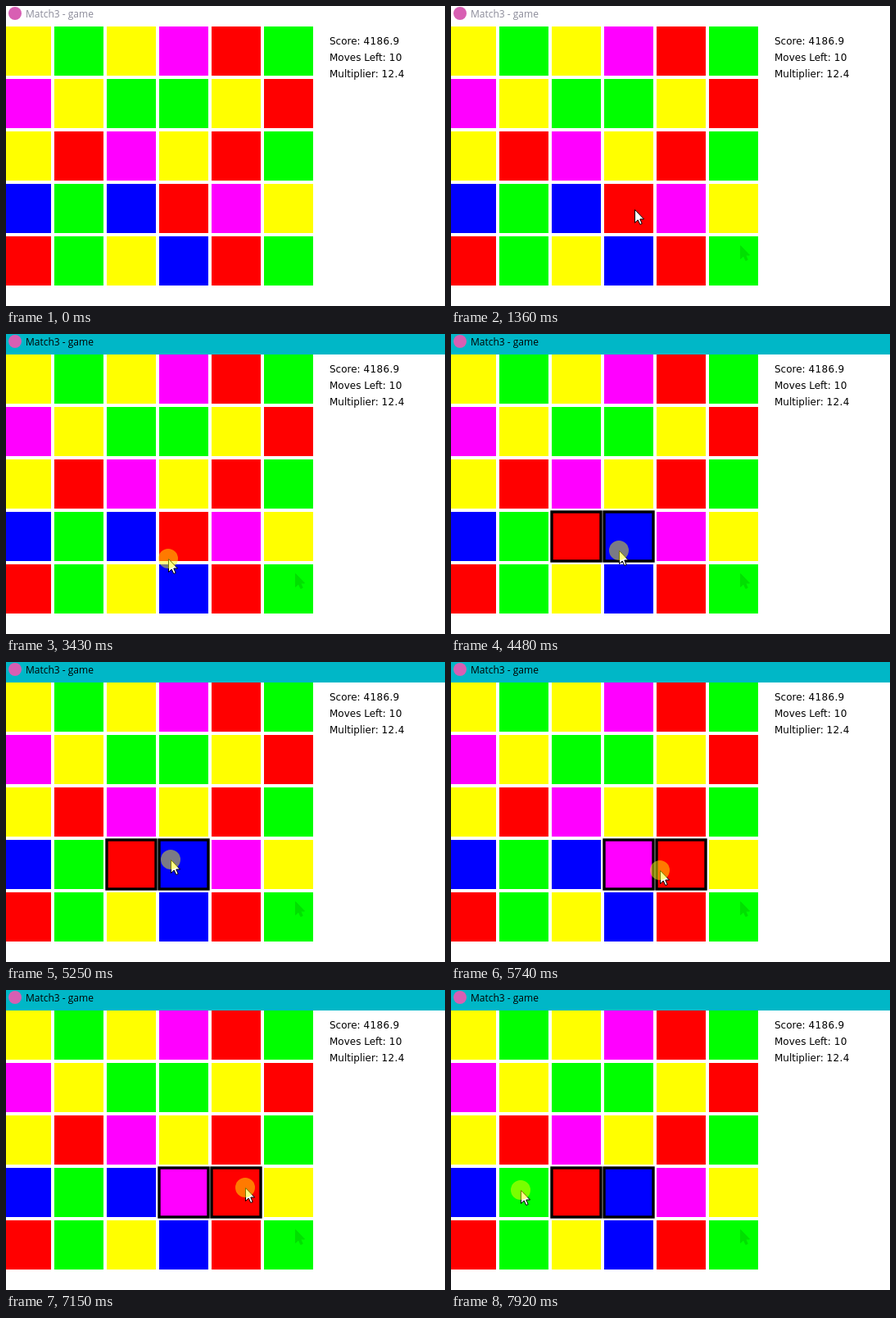
An HTML page for the animation above (7.99 s loop, 536 by 366 pixels).

```html
<!DOCTYPE html>
<html lang="en">
<head>
<meta charset="utf-8">
<title>Match3 - game</title>
<style>
  html, body { margin: 0; width: 100%; height: 100%; overflow: hidden; background: #fff; }
  #stage { position: absolute; left: 0; top: 0; width: 536px; height: 366px; overflow: hidden; }
  svg { position: absolute; left: 0; top: 0; }
  #bar { position: absolute; left: 0; top: 0; width: 536px; height: 25px; background: #fff; color: #8b8b99;
    font: 12px/20px "Open Sans", "Noto Sans", sans-serif; }
  #bar.active { background: #00b7c7; color: #000; }
  #bar i { position: absolute; left: 3px; top: 1px; width: 16px; height: 16px; border-radius: 50%; background: #d85fb3; }
  #bar span { position: absolute; left: 24px; top: 0; white-space: pre; }
  #stats { position: absolute; left: 395px; top: 33px; color: #000; white-space: pre;
    font: 12px/20px "DejaVu Sans", sans-serif; }
  #stats span { letter-spacing: .03em; }
</style>
</head>
<body>
<div id="stage">
  <div id="bar"><i></i><span>Match3 - game</span></div>
  <div id="stats">Score: <span>4186.9</span>
Moves Left: <span>10</span>
Multiplier: <span>12.4</span></div>
  <svg width="536" height="366" viewBox="0 0 536 366">
    <defs>
      <path id="arrow" d="M.5 .5V16.5L4.2 13L6.8 18.5L9.2 17.5L6.8 12H11.5Z"/>
    </defs>
    <g id="tiles"></g>
    <use id="trail" href="#arrow" x="353" y="292" fill="#00e000" stroke="#00e000"/>
    <g id="frames" fill="none" stroke="#000" stroke-width="3.4"></g>
    <g id="pointer">
      <use href="#arrow" fill="#fff" stroke="#000"/>
      <circle id="press" r="12" fill="#ff0" fill-opacity=".48"/>
    </g>
  </svg>
</div>
<script>
const LOOP = 7990, STEP = 70, PITCH = 64, SIZE = 60;
const COLORS = { Y: '#ff0', G: '#0f0', M: '#f0f', R: '#f00', B: '#00f' };
const BOARD = ['YGYMRG', 'MYGGYR', 'YRMYRG', 'BGBRMY', 'RGYBRG'];
const ENTER = 260, ARRIVE = 880, HOVER = 1080, REST = 1830, FOCUS = 1900, PRESS = 2160, DRAG = 3850;
const HELD = { col: 3, row: 3 }, ANCHOR = { x: 228, y: 246 };

// Circling around the anchor: time, angle in degrees, radius
const SPIN = [
  [2160, 526, 4], [2550, 270, 21], [2940, 262, 10], [3220, 182, 58], [3430, 137, 41],
  [3850, -50, 33], [4480, -218, 29], [5250, -529.5, 27.5], [6230, -878, 32], [7910, -1259, 143]
];

const $ = id => document.getElementById(id);
const mix = (a, b, k) => a + (b - a) * k;
const span = (t, from, to) => Math.min(1, Math.max(0, (t - from) / (to - from)));

function addRect(parent) {
  const r = document.createElementNS('http://www.w3.org/2000/svg', 'rect');
  r.setAttribute('width', SIZE);
  r.setAttribute('height', SIZE);
  return parent.appendChild(r);
}

function place(rect, col, row) {
  rect.setAttribute('x', col * PITCH - 5);
  rect.setAttribute('y', row * PITCH + 25);
}

const tiles = BOARD.map((line, row) => [...line].map((key, col) => {
  const tile = addRect($('tiles'));
  tile.setAttribute('fill', COLORS[key]);
  place(tile, col, row);
  return tile;
}));
const frames = [addRect($('frames')), addRect($('frames'))];
place(frames[0], HELD.col, HELD.row);

function enter(t) {
  const p = (1 - span(t, ENTER, ARRIVE)) ** 2;
  return [185 + 280 * p, 253 + 95 * p ** 1.75];
}

function hover(t) {
  const k = span(t, HOVER, REST), glide = Math.min(1, 3 * k);
  return [mix(185, 224, glide), mix(253, 248, glide) - 14 * Math.abs(Math.sin(3 * Math.PI * k))];
}

function circle(t) {
  const i = Math.max(1, SPIN.findIndex(p => p[0] >= t));
  const [t0, a0, r0] = SPIN[i - 1], [t1, a1, r1] = SPIN[i];
  const k = span(t, t0, t1);
  const angle = mix(a0, a1, k) * Math.PI / 180, radius = mix(r0, r1, k * k);
  return [ANCHOR.x + radius * Math.cos(angle), ANCHOR.y + radius * Math.sin(angle)];
}

function pointerAt(t) {
  const move = t < HOVER ? enter : t < PRESS ? hover : circle;
  return move(t).map(Math.round);
}

// The held tile trades places with the neighbour the pointer leans towards.
function neighbour(x, y) {
  const dx = x - ANCHOR.x, dy = y - ANCHOR.y;
  return Math.abs(dx) >= Math.abs(dy)
    ? { col: HELD.col + (dx < 0 ? -1 : 1), row: HELD.row }
    : { col: HELD.col, row: HELD.row + (dy < 0 ? -1 : 1) };
}

const show = (el, on) => { el.style.display = on ? '' : 'none'; };

let other = HELD;
function swapWith(next) {
  place(tiles[other.row][other.col], other.col, other.row);
  place(tiles[HELD.row][HELD.col], next.col, next.row);
  place(tiles[next.row][next.col], HELD.col, HELD.row);
  place(frames[1], next.col, next.row);
  other = next;
}

function draw(t) {
  const [x, y] = pointerAt(Math.floor(t / STEP) * STEP);
  $('pointer').setAttribute('transform', `translate(${x} ${y})`);
  show($('pointer'), t >= ENTER);
  show($('press'), t >= PRESS);
  show($('trail'), t >= 420);
  show($('frames'), t >= DRAG);
  $('bar').classList.toggle('active', t >= FOCUS);
  swapWith(t >= DRAG ? neighbour(x, y) : HELD);
}

const start = performance.now();
function tick() {
  draw((performance.now() - start) % LOOP);
  requestAnimationFrame(tick);
}
tick();
</script>
</body>
</html>
```
